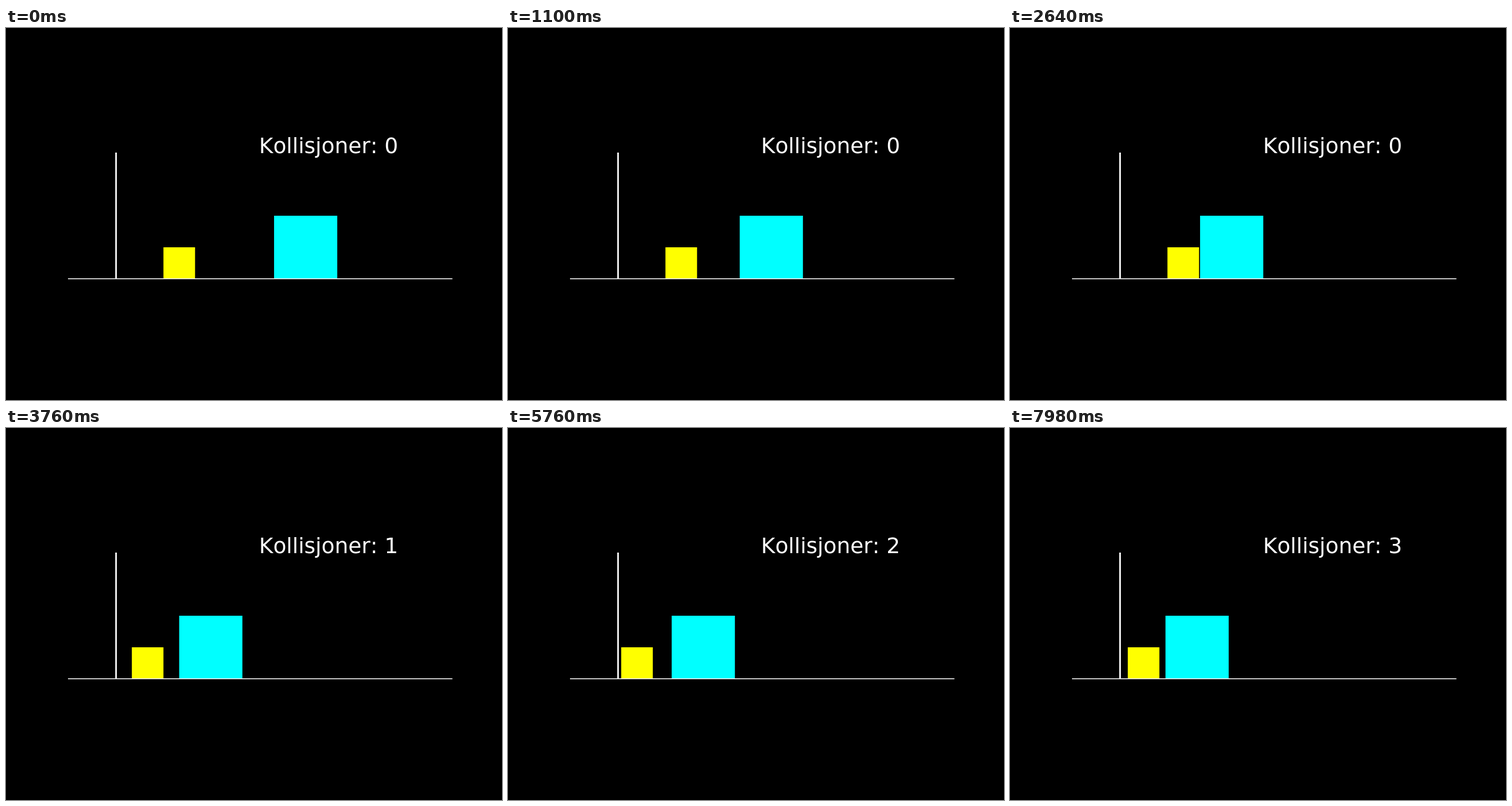
Animation, 864 px wide and 648 px high, one loop 8000 ms. Source, as an HTML page:

```html
<!DOCTYPE html>
<html lang="no">
<head>
<meta charset="utf-8">
<title>Kollisjoner</title>
<style>
  html, body { margin: 0; width: 100%; height: 100%; overflow: hidden; background: #000; }
  svg { display: block; width: 100vw; height: 100vh; }
  text { font: 37.5px "DejaVu Sans", sans-serif; font-kerning: none; fill: #fff; }
</style>
</head>
<body>
<svg viewBox="0 0 864 648">
  <rect width="864" height="648" fill="#000"/>
  <rect id="small" y="382" width="55.05" height="54" fill="#ff0"/>
  <rect id="large" y="327" width="110.1" height="109" fill="#0ff"/>
  <rect x="190.3" y="217" width="2.8" height="220" fill="#fff"/>
  <rect x="108" y="436" width="669.6" height="1.5" fill="#fff"/>
  <text id="label" x="440.8" y="218"></text>
</svg>
<script>
const LOOP = 8000;
const UNIT = 55.05;   // pixels per length unit
const WALL = 191.7;
const SPEED = 0.05;   // units the large block travels per full step

// Simulated steps against drawn steps; slow motion close to each impact
const PACE = [[0, 0], [49, 49], [70, 50.05], [83, 63.05], [123, 65.05],
              [126, 68.05], [165, 70], [166, 71], [171, 71.25]];
const HITS = [50.05, 65.05, 70];
const small = document.getElementById("small");
const large = document.getElementById("large");
const label = document.getElementById("label");

// Three quick steps, then a pause, every 140 ms
function stepAt(ms) {
  const q = ms + 20;
  return 3 * Math.floor(q / 140) + Math.min(2, Math.floor(q % 140 / 20)) - 1;
}

function simTime(n) {
  let i = 1;
  while (i < PACE.length - 1 && n > PACE[i][0]) i++;
  const [n0, s0] = PACE[i - 1], [n1, s1] = PACE[i];
  return s0 + (s1 - s0) * (n - n0) / (n1 - n0);
}

// The small block gains twice the large block's speed at each impact with it
function smallX(s) {
  const [a, b, c] = HITS;
  const between = (from, to) => Math.max(0, Math.min(s, to) - from);
  return 1.5 + SPEED * (-2 * between(a, b) + 2 * between(b, c) - 4 * between(c, Infinity));
}

function draw(ms) {
  const s = simTime(stepAt(ms));
  small.setAttribute("x", WALL + UNIT * smallX(s));
  large.setAttribute("x", WALL + UNIT * (5 - SPEED * s));
  label.textContent = "Kollisjoner: " + HITS.filter(h => s >= h - 1e-6).length;
}

const start = performance.now();
function tick() {
  draw((performance.now() - start) % LOOP);
  requestAnimationFrame(tick);
}
tick();
</script>
</body>
</html>
```
